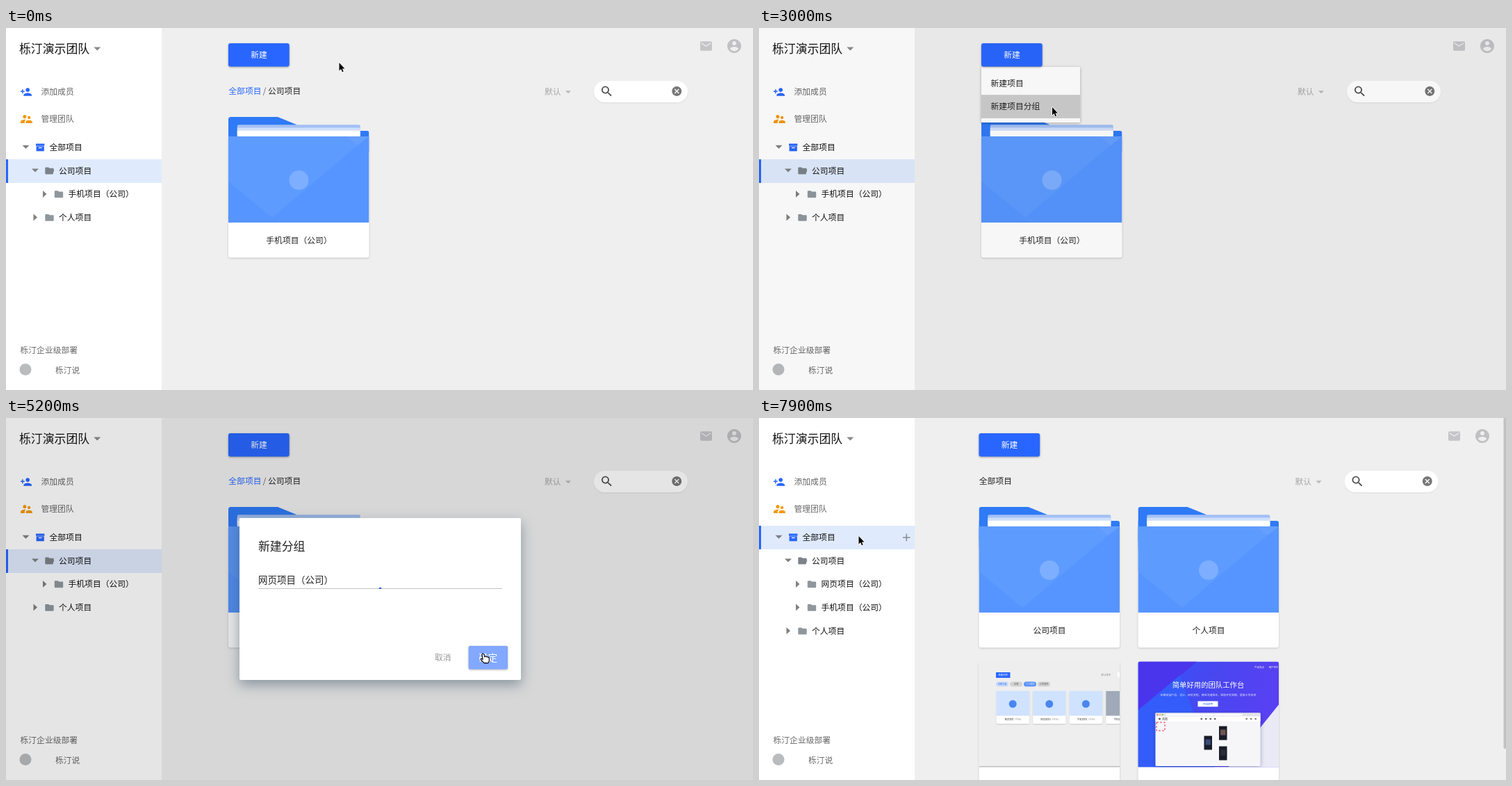
An HTML page with a canvas that plays this animation: 1075 px wide and 521 px high, repeating every 8 s.

```html
<!DOCTYPE html>
<html lang="zh-CN">
<head>
<meta charset="utf-8">
<title>项目分组</title>
<style>
html, body { margin: 0; width: 100%; height: 100%; overflow: hidden; background: #efefef; }
canvas { display: block; }
</style>
</head>
<body>
<canvas id="stage" width="1075" height="521"></canvas>
<script>
const ctx = document.getElementById('stage').getContext('2d');
const FONT = '"Noto Sans CJK SC", "Noto Sans CJK", "Noto Sans", sans-serif';
const BLUE = '#2866ff', BG = '#efefef';
const LOOP = 8000, STEP = 100;
const S = 11.8, M = 13.5, L = 16.85;

const ICONS = {
  addPerson: 'M15 12c2.21 0 4-1.79 4-4s-1.79-4-4-4-4 1.79-4 4 1.79 4 4 4zm-9-2V7H4v3H1v2h3v3h2v-3h3v-2H6zm9 4c-2.67 0-8 1.34-8 4v2h16v-2c0-2.66-5.33-4-8-4z',
  people: 'M16.5 12c1.38 0 2.49-1.12 2.49-2.5S17.88 7 16.5 7C15.12 7 14 8.12 14 9.5s1.12 2.5 2.5 2.5zM9 11c1.66 0 2.99-1.34 2.99-3S10.66 5 9 5C7.34 5 6 6.34 6 8s1.34 3 3 3zm7.5 3c-1.83 0-5.5.92-5.5 2.75V19h11v-2.25c0-1.83-3.67-2.75-5.5-2.75zM9 13c-2.33 0-7 1.17-7 3.5V19h7v-2.25c0-.85.33-2.34 2.37-3.47C10.5 13.1 9.66 13 9 13z',
  search: 'M15.5 14h-.79l-.28-.27C15.41 12.59 16 11.11 16 9.5 16 5.91 13.09 3 9.5 3S3 5.91 3 9.5 5.91 16 9.5 16c1.61 0 3.09-.59 4.23-1.57l.27.28v.79l5 4.99L20.49 19l-4.99-5zm-6 0C7.01 14 5 11.99 5 9.5S7.01 5 9.5 5 14 7.01 14 9.5 11.99 14 9.5 14z',
  clear: 'M12 2C6.47 2 2 6.47 2 12s4.47 10 10 10 10-4.47 10-10S17.53 2 12 2zm5 13.59L15.59 17 12 13.41 8.41 17 7 15.59 10.59 12 7 8.41 8.41 7 12 10.59 15.59 7 17 8.41 13.41 12 17 15.59z',
  mail: 'M20 4H4c-1.1 0-1.99.9-1.99 2L2 18c0 1.1.9 2 2 2h16c1.1 0 2-.9 2-2V6c0-1.1-.9-2-2-2zm0 4l-8 5-8-5V6l8 5 8-5v2z',
  account: 'M12 2C6.48 2 2 6.48 2 12s4.48 10 10 10 10-4.48 10-10S17.52 2 12 2zm0 3c1.66 0 3 1.34 3 3s-1.34 3-3 3-3-1.34-3-3 1.34-3 3-3zm0 14.2c-2.5 0-4.71-1.28-6-3.22.03-1.99 4-3.08 6-3.08 1.99 0 5.97 1.09 6 3.08-1.29 1.94-3.5 3.22-6 3.22z',
  folder: 'M10 4H4c-1.1 0-1.99.9-1.99 2L2 18c0 1.1.9 2 2 2h16c1.1 0 2-.9 2-2V8c0-1.1-.9-2-2-2h-8l-2-2z',
  openFolder: 'M10 4H4c-1.1 0-2 .9-2 2v12c0 1.1.9 2 2 2h16l3-10H22V8c0-1.1-.9-2-2-2h-8z'
};
for (const k in ICONS) ICONS[k] = new Path2D(ICONS[k]);
const ARROW = new Path2D('M0 0V11.5L2.6 9.1 4.4 13.2 6.2 12.4 4.4 8.5H8Z');
const HAND = new Path2D('M-1.5 1Q0-1 1.3 1L2.2 5 3 4Q4.3 3.6 4.8 4.8 6 4 6.7 5.2 8.2 4.8 8.6 6.5L9 10 7.5 13.6H1.5L-2.6 9.5Q-4 7.6-2.4 7.2L-.3 8.6Z');

// progress of t between a and b, 0..1
const seg = (t, a, b) => Math.max(0, Math.min(1, (t - a) / (b - a)));
const ease = p => p * p * (3 - 2 * p);

function rect(x, y, w, h, fill) {
  ctx.fillStyle = fill;
  ctx.fillRect(x, y, w, h);
}

function box(x, y, w, h, r, fill, shadow) {
  ctx.save();
  if (shadow) [ctx.shadowOffsetY, ctx.shadowBlur, ctx.shadowColor] = shadow;
  ctx.fillStyle = fill;
  ctx.beginPath();
  ctx.roundRect(x, y, w, h, r);
  ctx.fill();
  ctx.restore();
}

function poly(fill, ...pts) {
  ctx.fillStyle = fill;
  ctx.beginPath();
  for (let i = 0; i < pts.length; i += 2) ctx.lineTo(pts[i], pts[i + 1]);
  ctx.fill();
}

function disc(x, y, r, fill) {
  ctx.fillStyle = fill;
  ctx.beginPath();
  ctx.arc(x, y, r, 0, 7);
  ctx.fill();
}

function text(str, x, cy, size, color, weight = 400, align = 'left') {
  ctx.font = `${weight} ${size}px ${FONT}`;
  ctx.textAlign = align;
  ctx.fillStyle = color;
  ctx.fillText(str, x, cy + size * 0.38);
}

function icon(name, cx, cy, scale, color) {
  ctx.save();
  ctx.translate(cx, cy);
  ctx.scale(scale, scale);
  ctx.translate(-12, -12);
  ctx.fillStyle = color;
  ctx.fill(ICONS[name]);
  ctx.restore();
}

const down = (x, y, w, c) => poly(c, x - w, y - w / 2, x + w, y - w / 2, x, y + w / 2);
const right = (x, y, c) => poly(c, x - 2.5, y - 5, x + 3, y, x - 2.5, y + 5);

function sidebar(s) {
  rect(0, 0, 224, 521, '#fff');
  text('栎汀演示团队', 19, 30, L, '#111', 500);
  down(131.3, 30, 5, '#8a8a8a');
  icon('addPerson', 29, 92, 0.73, BLUE);
  text('添加成员', 50.5, 92, S, '#666');
  icon('people', 29.4, 131, 0.84, '#f5980c');
  text('管理团队', 50.5, 131, S, '#666');

  const rows = [['全部项目', 0], ['公司项目', 1], ['手机项目（公司）', 2], ['个人项目', 1]];
  if (s.added) rows.splice(2, 0, ['网页项目（公司）', 2]);
  const chosen = s.all ? 0 : 1;
  rows.forEach(([name, depth], i) => {
    const y = 171.5 + 33.7 * i, dx = 13.5 * depth;
    if (i === chosen) {
      rect(0, Math.round(y - 16.6), 224, 34, '#dfeafd');
      rect(0, Math.round(y - 16.6), 3, 34, BLUE);
    }
    if (i < 2) down(28.5 + dx, y - 0.3, 5, '#808080');
    else right(28.5 + dx, y, '#808080');
    if (i === 0) {
      rect(43, 166.5, 12.4, 3.2, BLUE);
      rect(43.6, 170.3, 11.2, 7, BLUE);
      rect(47, 171.8, 4.6, 1.3, '#fff');
    } else {
      icon(i === 1 ? 'openFolder' : 'folder', 49 + dx, y + 0.3, 0.62, i === 1 ? '#7b8289' : '#8f979d');
    }
    text(name, 62.5 + dx, y, S, '#111', 500);
  });
  if (s.all) {
    rect(207, 171.2, 10.5, 1.6, '#8a8f96');
    rect(211.5, 166.7, 1.6, 10.5, '#8a8f96');
  }

  text('栎汀企业级部署', 20.5, 463.5, S, '#666');
  disc(28, 491.5, 8.5, '#b9bbbd');
  text('栎汀说', 71, 493, S, '#666');
}

function folderArt() {
  box(0, 20, 202.5, 30, [0, 3, 0, 0], '#2f7af6');
  box(0, 0, 60, 60, [3, 0, 0, 0], '#2f7af6');
  poly('#2f7af6', 50, 0, 71, 0, 98, 11, 98, 40, 50, 40);
  box(12.8, 11.3, 177, 20, [2, 2, 0, 0], '#a3c0f4');
  rect(12.8, 15.5, 177, 10, '#d0e0fb');
  rect(12.8, 19.8, 177, 10, '#fff');
  rect(0, 28, 202.5, 124, '#5695ff');
  poly('#5d9bff', 0, 28, 175, 28, 187, 40, 63, 145, 0, 93);
  poly('#659fff', 170, 28, 202.5, 28, 186, 41);
  disc(101.5, 91, 14, '#7daeff');
}

function boardThumb() {
  rect(0, 0, 202.5, 152, '#eeeeee');
  rect(24.5, 15.5, 20.5, 8, BLUE);
  text('新建项目', 34.7, 19.5, 3.4, '#fff', 400, 'center');
  text('默认排序', 176, 19.5, 3.4, '#888');
  disc(203, 19, 4, '#fff');
  ['全部分组', '全部', '个人项目', '公司项目'].forEach((name, i) => {
    const x = 24.5 + 20 * i;
    box(x, 29, 18, 7, 3.5, ['#c9daf8', '#d2d2d2', '#5b94f5', '#d2d2d2'][i]);
    text(name, x + 9, 32.5, 3.2, i === 2 ? '#fff' : i ? '#555' : BLUE, 400, 'center');
  });
  for (let i = 0; i < 4; i++) {
    const x = 25 + 52.6 * i;
    box(x, 42.5, 47.5, 47, 1, '#fff', [1, 2, 'rgba(0,0,0,.15)']);
    rect(x, 42.5, 47.5, 35.5, i < 3 ? '#cfe2ff' : '#a0a9b8');
    if (i < 3) disc(x + 23.7, 61, 5.5, '#4a86f0');
    text(['网页项目（个人）', '网页项目2（个人）', '手机项目1（个人）', '手机项目2（个人）'][i], x + 25, 83.7, 3.2, '#333', 500, 'center');
  }
  rect(0, 151, 202.5, 1, '#8b8b8b');
}

function siteThumb() {
  const g = ctx.createLinearGradient(0, 0, 202, 60);
  g.addColorStop(0, '#3158fa');
  g.addColorStop(0.5, '#4747f0');
  g.addColorStop(1, '#5a40f2');
  rect(0, 0, 202.5, 152, g);
  poly('#4a34ec', 0, 0, 85, 0, 0, 70);
  poly('#345cfb', 0, 70, 60, 20, 110, 152, 0, 152);
  poly('#e9eaf6', 202.5, 62, 202.5, 152, 130, 152);
  text('产品亮点', 167.5, 8, 3.5, '#fff');
  text('用户评价', 188, 8, 3.5, '#fff');
  text('简单好用的团队工作台', 101, 33.5, 10.35, '#fff', 500, 'center');
  text('无需安装产品、设计、研发流程，降低沟通成本，帮助开发周期，提高工作效率', 101, 47.8, 3.95, '#e3e7ff', 400, 'center');
  rect(86, 57, 29, 8, '#fff');
  text('开始使用', 100.5, 61, 3.6, BLUE, 500, 'center');

  box(25, 74, 151, 76.5, 1.5, '#f6f6f8', [2, 6, 'rgba(20,20,90,.35)']);
  rect(25, 74, 151, 5, '#e2e3e8');
  ['#f2605a', '#f5bd45', '#5cc454'].forEach((c, i) => disc(28 + 3.5 * i, 76.5, 1.1, c));
  rect(40, 75.3, 110, 2.5, '#fff');
  rect(25, 79, 151, 7, '#fff');
  disc(31, 82.5, 1.5, '#555');
  text('蓝图', 34.5, 82.5, 4, '#444');
  for (let i = 0; i < 4; i++) rect(90 + 6.5 * i, 81.5, 2.5, 2.2, '#666');
  for (let i = 0; i < 3; i++) rect(155 + 6.5 * i, 81.5, 2.3, 2.2, '#777');
  ctx.strokeStyle = '#e8324a';
  ctx.setLineDash([3, 2]);
  ctx.strokeRect(26.5, 87.5, 12, 12);
  ctx.setLineDash([]);
  [[95, 107], [116.5, 93], [116.5, 122]].forEach(([x, y], i) => {
    rect(x, y, 11.5, 20, '#191c28');
    rect(x + 2, y + 5, 7.5, 8, ['#3a4a78', '#6d5550', '#2b2e3a'][i]);
  });
}

function card(x, y, label, art) {
  ctx.save();
  ctx.translate(x, y);
  box(0, art === folderArt ? 28 : 0, 202.5, art === folderArt ? 174.5 : 202.5, 3, '#fff', [1, 3, 'rgba(0,0,0,.18)']);
  ctx.beginPath();
  ctx.roundRect(0, 0, 202.5, 152, [3, 3, 0, 0]);
  ctx.clip();
  art();
  ctx.restore();
  text(label, x + 101.5, y + 177.3, S, '#222', 400, 'center');
}

function menu(s) {
  if (s.menu <= 0) return;
  ctx.save();
  ctx.globalAlpha = s.menu;
  ctx.translate(0, 56);
  ctx.scale(1, s.menu);
  box(320, 0, 142, 80, 1, '#fff', [1, 4, 'rgba(0,0,0,.28)']);
  if (s.item >= 0) rect(320, 6.5 + 33.7 * s.item, 142, 33.7, s.pressed ? '#cccccc' : '#eeeeee');
  text('新建项目', 333.5, 23.3, S, '#222');
  text('新建项目分组', 333.5, 57, S, '#222');
  ctx.restore();
}

function page(s) {
  rect(0, 0, 1075, 521, BG);
  const bar = s.all ? 7 : 0;
  icon('mail', 1007.5 - bar, 26, 0.85, '#c5c5c7');
  icon('account', 1048 - bar, 26, 1, '#c1c1c4');

  ctx.save();
  ctx.translate(-bar / 2, 0);
  if (s.all) {
    text('全部项目', 320.3, 91, S, '#222');
  } else {
    text('全部项目', 320.3, 91, S, BLUE);
    text('/', 372, 91, S, '#666', 400, 'center');
    text('公司项目', 377, 91, S, '#222');
  }
  text('默认', 775, 91.5, S, '#a6a6a6');
  down(809, 92.3, 4, '#b8b8b8');
  box(846, 76, 135, 31, 15.5, '#fff', [1, 2, 'rgba(0,0,0,.08)']);
  icon('search', 864.6, 91.2, 0.84, '#484848');
  icon('clear', 965.3, 91, 0.69, '#777');

  const labels = s.all ? ['公司项目', '个人项目'] : s.added ? ['网页项目（公司）', '手机项目（公司）'] : ['手机项目（公司）'];
  labels.forEach((name, i) => card(320 + 229 * i, 128, name, folderArt));
  if (s.all) {
    card(320, 350.5, '', boardThumb);
    card(549, 350.5, '', siteThumb);
  }
  menu(s);
  box(320, 22, 87.7, 33.5, 3, s.hover ? '#2b63e4' : BLUE, [1, 3, 'rgba(0,0,0,.35)']);
  text('新建', 364, 39, S, '#fff', 400, 'center');
  ctx.restore();
  if (s.all) box(1071.5, -3, 3.5, 479, 2, '#c1c1c1');
}

function dialog(t) {
  const p = ease(seg(t, 3250, 3600));
  if (p <= 0 || t >= 5500) return;
  ctx.save();
  ctx.globalAlpha = p;
  ctx.translate(538.5, 260.5);
  ctx.scale(0.9 + 0.1 * p, 0.9 + 0.1 * p);
  ctx.translate(-538.5, -260.5);
  box(336, 144, 405, 233, 2, '#fff', [7, 18, 'rgba(60,85,105,.5)']);
  text('新建分组', 363, 185, L, '#222');

  const value = '网页项目（公司）'.slice(0, Math.floor(8 * seg(t, 3950, 4500)));
  if (value) text(value, 363, 232.5, M, '#222');
  else text('项目分组名称', 363, 233, S, '#aaa');
  if (t >= 3600 && t < 4900) {
    ctx.font = `400 ${M}px ${FONT}`;
    const end = value.length === 8 ? M / 2 : 0;
    rect(363 + ctx.measureText(value).width - end, 223, 1, 18, '#333');
  }
  rect(363, 245, 351, 1, '#c4c4c4');
  const line = 351 * ease(seg(t, 3500, 3800)) * (1 - seg(t, 4900, 5203));
  rect(538.5 - line / 2, 244, line, 2, '#2a66e4');

  text('取消', 617, 345, S, '#999');
  box(665.7, 328, 56.3, 33.5, 2, t >= 5000 ? '#82a8ff' : BLUE, [1, 3, 'rgba(0,0,0,.3)']);
  text('确定', 693.7, 345, M, '#fff', 400, 'center');
  ctx.restore();
}

// [start, end, x, y] moves of the pointer
const MOVES = [
  [900, 1500, 381, 37],
  [1950, 2600, 422, 114],
  [4500, 4900, 686.5, 339],
  [5900, 7000, 143.5, 170]
];

function pointer(t) {
  let x = 479.5, y = 50;
  for (const [a, b, tx, ty] of MOVES) {
    const p = ease(seg(t, a, b));
    x += (tx - x) * p;
    y += (ty - y) * p;
  }
  return { x, y };
}

function drawPointer({ x, y }, hand) {
  ctx.save();
  ctx.translate(x, y);
  ctx.lineJoin = 'round';
  ctx.lineWidth = hand ? 1.1 : 1.6;
  ctx.strokeStyle = hand ? '#000' : '#fff';
  ctx.fillStyle = hand ? '#fff' : '#000';
  const shape = hand ? HAND : ARROW;
  if (hand) ctx.fill(shape);
  ctx.stroke(shape);
  if (!hand) ctx.fill(shape);
  ctx.restore();
}

function draw(t) {
  const at = pointer(t);
  const early = t < 3000;
  const inButton = early && at.x >= 320 && at.x < 408 && at.y >= 22 && at.y < 56;
  const open = t < 3100 ? ease(seg(t, 1600, 1900)) : 1 - seg(t, 3100, 3400);
  const inMenu = open > 0 && at.x < 462 && at.y >= 62;
  const s = {
    added: t >= 5500,
    all: t >= 7400,
    hover: inButton,
    menu: open,
    item: inMenu ? (at.y < 96 ? 0 : 1) : -1,
    pressed: t >= 2800
  };
  page(s);
  sidebar(s);
  if (t < 5500) rect(0, 0, 1075, 521, `rgba(0,0,0,${0.1 * seg(t, 2900, 3200)})`);
  dialog(t);
  const inConfirm = t >= 4500 && t < 5500 && at.x > 666 && at.y > 328;
  drawPointer(at, inButton || (early && inMenu) || inConfirm);
}

const start = performance.now();
function tick() {
  const t = (performance.now() - start) % LOOP;
  draw(Math.floor(t / STEP) * STEP);
  requestAnimationFrame(tick);
}
tick();
</script>
</body>
</html>
```
